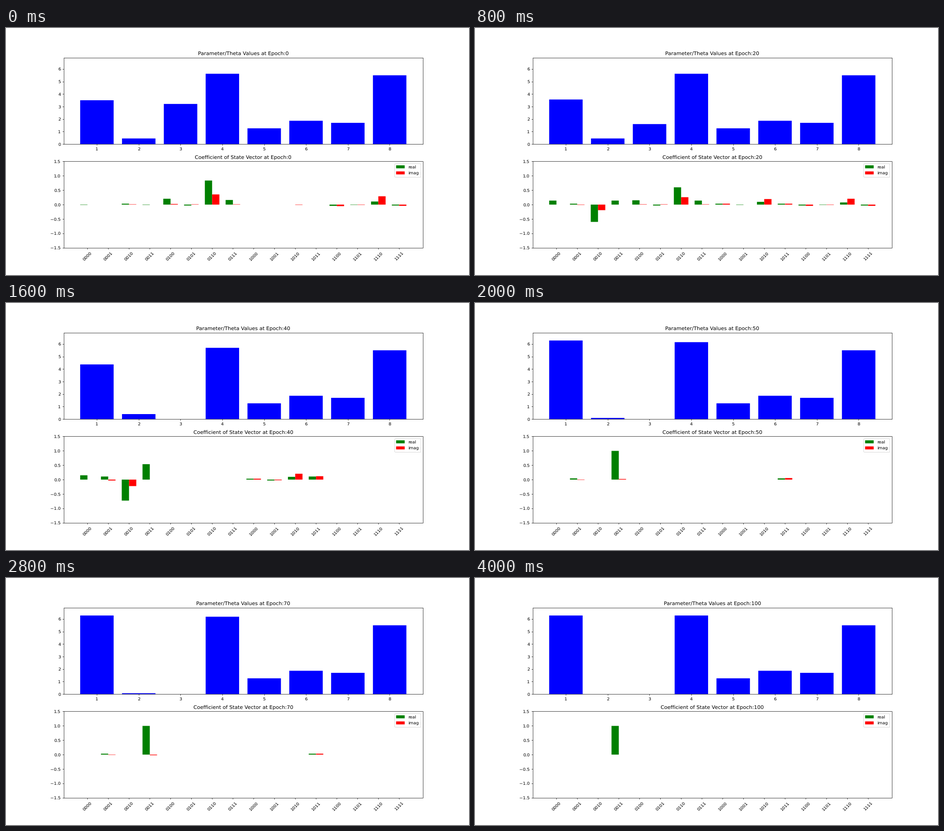
Animation of 1025 by 547 pixels, one loop 4200 ms. Source, as a matplotlib script:

```python
import numpy as np
import matplotlib.pyplot as plt
from matplotlib.animation import FuncAnimation

plt.rcParams["font.family"] = "DejaVu Sans"
plt.rcParams["text.hinting"] = "none"

FRAMES, INTERVAL, EPOCH_STEP = 21, 200, 5
TAU = 2 * np.pi
GRID = 280 / 3  # height steps per unit; smaller amplitudes vanish
WIDTH = 0.35
FIXED = [1.26, 1.865, 1.7, 5.5]  # angles the training leaves alone

BITS = (np.arange(16)[:, None] >> np.arange(4)) & 1
ONES = BITS.sum(axis=1)
SIGN = (-1.0) ** (1 + BITS[:, 2] + ONES * (ONES + 1) // 2)
PHASE = BITS @ [-0.305, 0.305, 0.095, 0.82]


def thetas(epoch):
    """Runaway growth, linear descent, and a shared two-stage decay."""
    first = min(TAU, 3.5 + 0.87 * np.exp(0.13 * (epoch - 40)))
    third = max(0, 3.21 - 0.0805 * epoch)
    drop = 1 / (1 + np.exp((epoch - 46) / 2.9))
    tail = 0.2 * np.cos(np.pi / 2 * (epoch - 50) / 42)
    rest = max(drop, tail)
    return np.array([first, 0.45 * rest, third, TAU - 0.66 * rest, *FIXED])


def state(theta, epoch):
    """Four rotated qubits, entangled pairwise by sign flips."""
    cos, sin = np.cos(theta[:4] / 2), np.sin(theta[:4] / 2)
    flipped = BITS ^ np.array([1, 1, 0, 0])
    size = np.where(flipped == 1, sin, cos).prod(axis=1)
    wobble = 0.022 * np.sin(np.pi / 20 * np.clip(epoch, 40, 80))
    return SIGN * size * np.exp(1j * (PHASE + wobble))


def set_heights(bars, values):
    for bar, value in zip(bars, values):
        bar.set_height(value)


def on_grid(values):
    return np.round(values * GRID) / GRID


fig, (top, low) = plt.subplots(2, 1, figsize=(15, 8.005), dpi=1025 / 15)

x = np.arange(16)
theta_bars = top.bar(np.arange(1, 9), np.ones(8), color="blue")
real_bars = low.bar(x - WIDTH / 2, np.ones(16), WIDTH, color="green", label="real")
imag_bars = low.bar(x + WIDTH / 2, np.ones(16), WIDTH, color="red", label="imag")

top.set_xlim(0.21, 8.79)
top.set_ylim(0, 1.1 * TAU)
top.set_xticks(range(1, 9))
top.set_yticks(range(7))
low.set_xlim(-1.135, 16.135)
low.set_ylim(-1.5, 1.5)
low.set_xticks(x, [f"{k:04b}" for k in x], rotation=45)
low.set_yticks(np.arange(-1.5, 1.6, 0.5))
legend = low.legend(loc="upper right")
top_title = top.set_title("")
low_title = low.set_title("")

for patch in [*theta_bars, *real_bars, *imag_bars, *legend.get_patches()]:
    patch.set_snap(False)


def update(i):
    epoch = i * EPOCH_STEP
    theta = thetas(epoch)
    psi = state(theta, epoch)
    set_heights(theta_bars, theta)
    set_heights(real_bars, on_grid(psi.real))
    set_heights(imag_bars, on_grid(psi.imag))
    top_title.set_text(f"Parameter/Theta Values at Epoch:{epoch}")
    low_title.set_text(f"Coefficient of State Vector at Epoch:{epoch}")
    return [*theta_bars, *real_bars, *imag_bars, top_title, low_title]


anim = FuncAnimation(fig, update, frames=FRAMES, interval=INTERVAL,
                     repeat=True, repeat_delay=0, blit=False)
plt.show()
```
